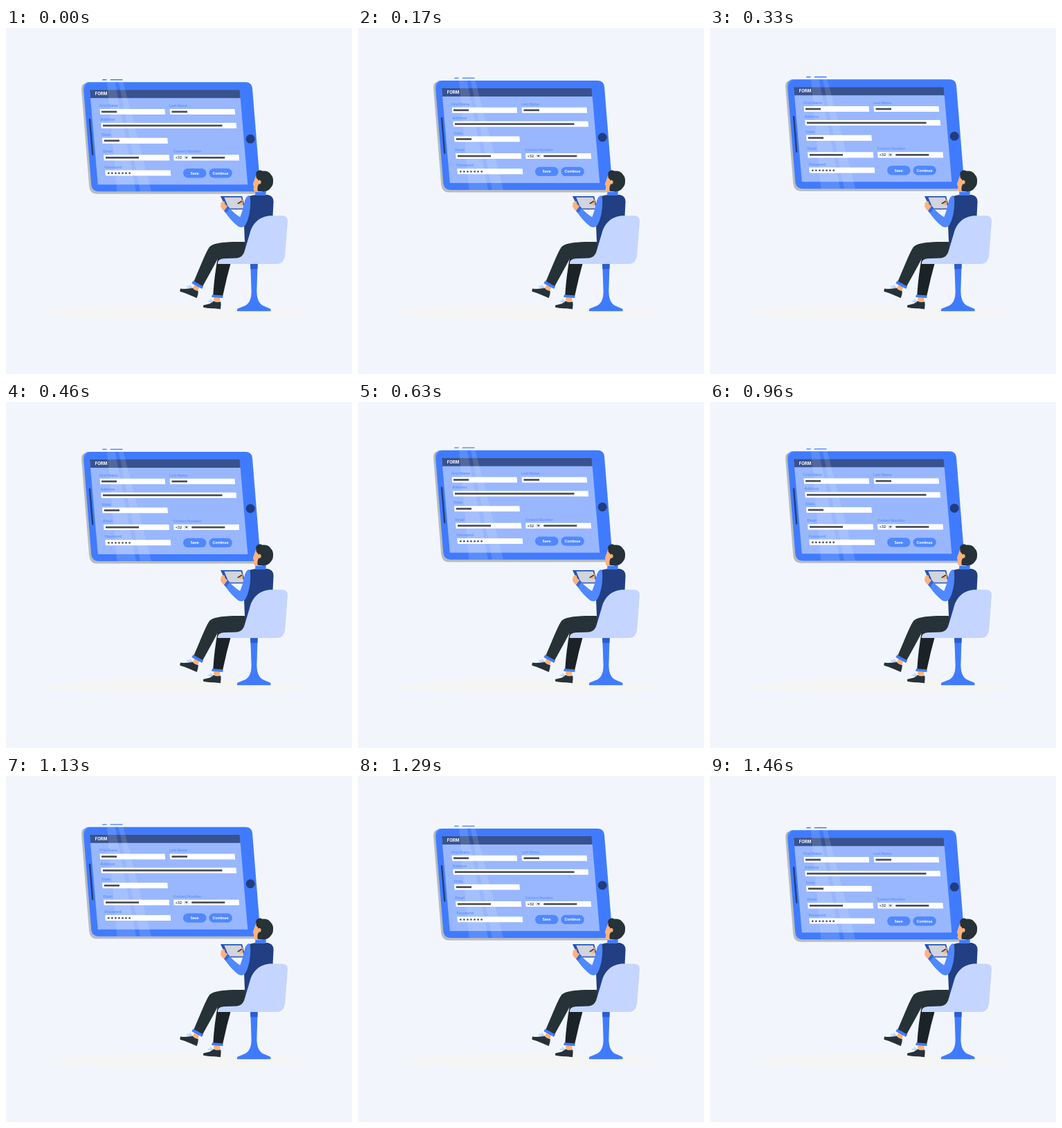
Recreate the animation shown at these times as an HTML page. Size 500 by 500 pixels, loop 1.5 s.

```html
<!DOCTYPE html>
<html lang="en">
<head>
<meta charset="utf-8">
<title>Online form</title>
<style>
html, body { margin: 0; width: 100%; height: 100%; overflow: hidden; background: #f2f6fc; }
svg { display: block; width: 100vw; height: 100vh; }
text { font-family: Inter, "Open Sans", sans-serif; font-weight: 700; }
.label { font-size: 5.1px; fill: #6495ff; }
.button { font-size: 5.2px; fill: #fff; text-anchor: middle; }
</style>
</head>
<body>
<svg viewBox="0 0 500 500" xmlns="http://www.w3.org/2000/svg">
  <ellipse cx="247" cy="411.5" rx="191" ry="10.5" fill="#f5f5f5"/>

  <g id="tablet">
    <path fill="#407bff" d="M139.5 74H145.5V75.4H139ZM151 74H168.3L168.7 75.4H150.6Z"/>
    <path fill="#b7bcc2" d="M120 80.5L113 80.5Q108.6 82.5 109 89L120.2 229Q121.5 239.7 131 239.7H357Q363 239.7 365 235L250 190Z"/>
    <path id="case" fill="#407bff" d="M121 78.2H346Q355 78.2 356 87L367.2 226Q367.6 236.3 359 236.3H134.5Q124.5 236.3 123.3 227L112 88Q111.5 78.2 121 78.2Z"/>
    <path fill="#6797ff" d="M121 78.2Q111.5 78.2 112 88L112.3 91Q113 81 121 78.2Z"/>
    <path fill="#98b7ff" d="M121 89.2H337.7L349.3 226.2H132.8Z"/>
    <path fill="#38528f" d="M121 89.2H337.7L338.7 101.2H122Z"/>
    <g fill="#fff" opacity=".13">
      <path d="M146 78.2H157.5L188 236.3H160.5Z"/>
      <path d="M163 78.2H169.5L210 236.3H194Z"/>
    </g>
    <path d="M121 132.2L125.2 182.8" stroke="#213d80" stroke-width="2.4" stroke-linecap="round"/>
    <circle cx="353.2" cy="160.3" r="6.5" fill="#213d80"/>
    <text x="128.8" y="97.4" font-size="5.9" fill="#fff">FORM</text>
    <g id="form"></g>
  </g>

  <g id="stand">
    <path fill="#407bff" d="M353.2 340H363.6L362.4 380Q362.4 397 372 401.5L381.5 405.5Q383.3 406.5 382.5 409.2H334Q333.2 406.5 335 405.5L345 401.5Q354.8 397 354.6 380Z"/>
    <path fill="#2c5ed1" d="M353 340H363.8L363.4 348.3H353.4Z"/>
  </g>

  <g id="far-leg">
    <path fill="#ffb27d" d="M300.5 388H309.5L309 396H300Z"/>
    <path fill="#263238" d="M285 400.8Q290 399.5 295 398.2L299.5 394.8Q304 397.3 310.3 395.5Q311.2 400 310 406.2L301 405.2Q292 405.6 285.2 403.8Z"/>
    <path d="M292.5 394.5L297.6 396.4M295.5 392.6L298.4 395.4" stroke="#9fbfff" stroke-width="1.3" stroke-linecap="round"/>
    <path fill="#1b2327" d="M306 332L326 335Q319 360 313.2 387.3L299.3 386Q301 358 306 332Z"/>
    <path fill="#407bff" d="M298 385.2L313.5 386.4L313.3 390.2L297.2 389Z"/>
  </g>

  <g id="near-leg">
    <path fill="#ffb27d" d="M272.5 370.5L279.5 374L277 381L269.5 377.5Z"/>
    <path fill="#263238" d="M252 376.4Q258 377.4 264.2 376.5L269.5 375.6Q272 379.5 277.8 380.2Q278 385 275.7 390.2L268.2 387Q260 383 251.3 380.8Z"/>
    <path d="M261.8 373.4L267 376M265.4 372L268.4 375.4" stroke="#9fbfff" stroke-width="1.3" stroke-linecap="round"/>
    <path fill="#263238" d="M348 309.2C325 308.6 302 309.5 295 315.5C290 320 279.5 348 271 367.5L283.5 374.5Q295 354 306 333.5L348 334Z"/>
    <path fill="#407bff" d="M270.4 365.3L285.2 373.5L283.2 377L268.4 369Z"/>
  </g>

  <g id="device">
    <path fill="#2453b8" d="M310 243H341.2L346 262.2H319Z"/>
    <path fill="#d0d5de" d="M315.3 244.8H339.8L344 260.7H322Z"/>
    <path fill="#ffb27d" d="M335.5 251.5L342 247.8V256L337 255.5Z"/>
    <path d="M335.2 253.6L340.5 250.4" stroke="#263238" stroke-width="1.6" stroke-linecap="round"/>
    <path fill="#ffb27d" d="M310.8 252.2Q313 249.6 315.6 250.4L316.8 254.8L321.5 258.6L317 266Q311.4 262.4 310 257.5Z"/>
  </g>

  <g id="torso">
    <path fill="#213f82" d="M352 243Q360 240 378 241Q386.8 242.5 386.6 251L385 282L362 318H345.4L343.8 279Z"/>
    <path fill="#5088ff" d="M351 242Q346 243.4 344.2 253Q342 264.5 338.3 273.2Q330 268.5 321.2 258.2L316 265.3Q324.5 278 335.2 286.6Q342 290.3 346.3 284.2Q353 272 353.2 252Q353.2 242 351 242Z"/>
    <path fill="#3569dc" d="M320.4 257L323.5 260.4L317.7 267.3L315.1 264.2Z"/>
    <path fill="#407bff" d="M360.5 235.7L376 236.2L375.2 242H360Z"/>
  </g>

  <g id="head">
    <path fill="#ffb27d" d="M361.5 212.5L372 215L371 237H363.5Q358 237.2 357.6 232.8L358.3 229.5L356.8 225.5L358.7 220Z"/>
    <path fill="#263238" d="M361.5 213.5Q360.2 208 364.2 206.2Q367.5 204.5 370.5 206.7Q378.5 206 382.2 211Q387 216 386 222.5Q386 227.5 382.3 231.3Q379 236.2 372 236.6L363.8 235.7Q362.6 230 365 226L364 218.7Q361 217 361.5 213.5Z"/>
    <ellipse cx="366" cy="222.8" rx="2.6" ry="3" fill="#ffb27d"/>
  </g>

  <path id="seat" fill="#c4d6ff" d="M306 341Q305.4 333.6 314 333.2L334 332.4Q341.5 331.5 344.2 324Q348.5 310 353 294.5C357 281 368 271.2 384 271.2H398.5Q407.8 271.2 407 280L403.4 327Q402.3 341 391 341Z"/>
</svg>
<script>
const LOOP = 1500, STEPS = 36, LIFT = 10;
const NS = "http://www.w3.org/2000/svg";
const form = document.getElementById("form");
const tablet = document.getElementById("tablet");

function add(tag, attrs, content) {
  const el = document.createElementNS(NS, tag);
  for (const key in attrs) el.setAttribute(key, attrs[key]);
  if (content) el.textContent = content;
  form.appendChild(el);
}

// Label, then a slanted white box with an optional bar of filled-in text.
function field(name, x, y, width, barX, barW) {
  add("text", { x: x - .6, y: y - 3, class: "label" }, name);
  add("path", { d: `M${x} ${y}h${width}l.7 8.1h${-width}z`, fill: "#fff" });
  if (barW) add("rect", { x: barX, y: y + 2.7, width: barW, height: 2.7, fill: "#484c54" });
}

function button(name, x) {
  add("rect", { x, y: 203, width: 33.5, height: 13.4, rx: 6.7, fill: "#5088ff" });
  add("text", { x: x + 16.7, y: 211.5, class: "button" }, name);
}

field("First Name", 135.5, 117, 94, 138, 22);
field("Last Name", 236.5, 117, 94, 239.5, 22.5);
field("Address", 137.2, 137, 195.3, 140, 172.5);
field("State", 138.9, 158.8, 94.4, 141.8, 22.2);
field("Email", 141, 183.3, 94.6, 144, 48);
field("Contact Number", 242, 183.3, 94.5, 268.3, 48);
field("Password", 143.2, 205.5, 94.4);

for (let i = 0; i < 7; i++)
  add("circle", { cx: 148.3 + i * 5.05, cy: 209.8, r: 1.35, fill: "#484c54" });

add("text", { x: 244.4, y: 189.2, "font-size": 5, fill: "#384048" }, "+32");
add("rect", { x: 257, y: 184.7, width: 7.2, height: 5.3, fill: "#e3e4e6" });
add("path", { d: "M258.8 186.4h3.8l-1.9 2.2z", fill: "#263238" });

button("Save", 256);
button("Continue", 293.4);

// Steady rise and fall, advanced in 24 steps a second.
function draw(ms) {
  const step = Math.floor((ms % LOOP) / LOOP * STEPS + .05) % STEPS;
  const half = (STEPS - 1) / 2;
  const y = -LIFT * (1 - Math.abs(step - half) / half);
  tablet.setAttribute("transform", `translate(0 ${y.toFixed(3)})`);
}

const start = performance.now();
function tick(now) {
  draw(Math.max(0, now - start));
  requestAnimationFrame(tick);
}
draw(0);
requestAnimationFrame(tick);
</script>
</body>
</html>
```
